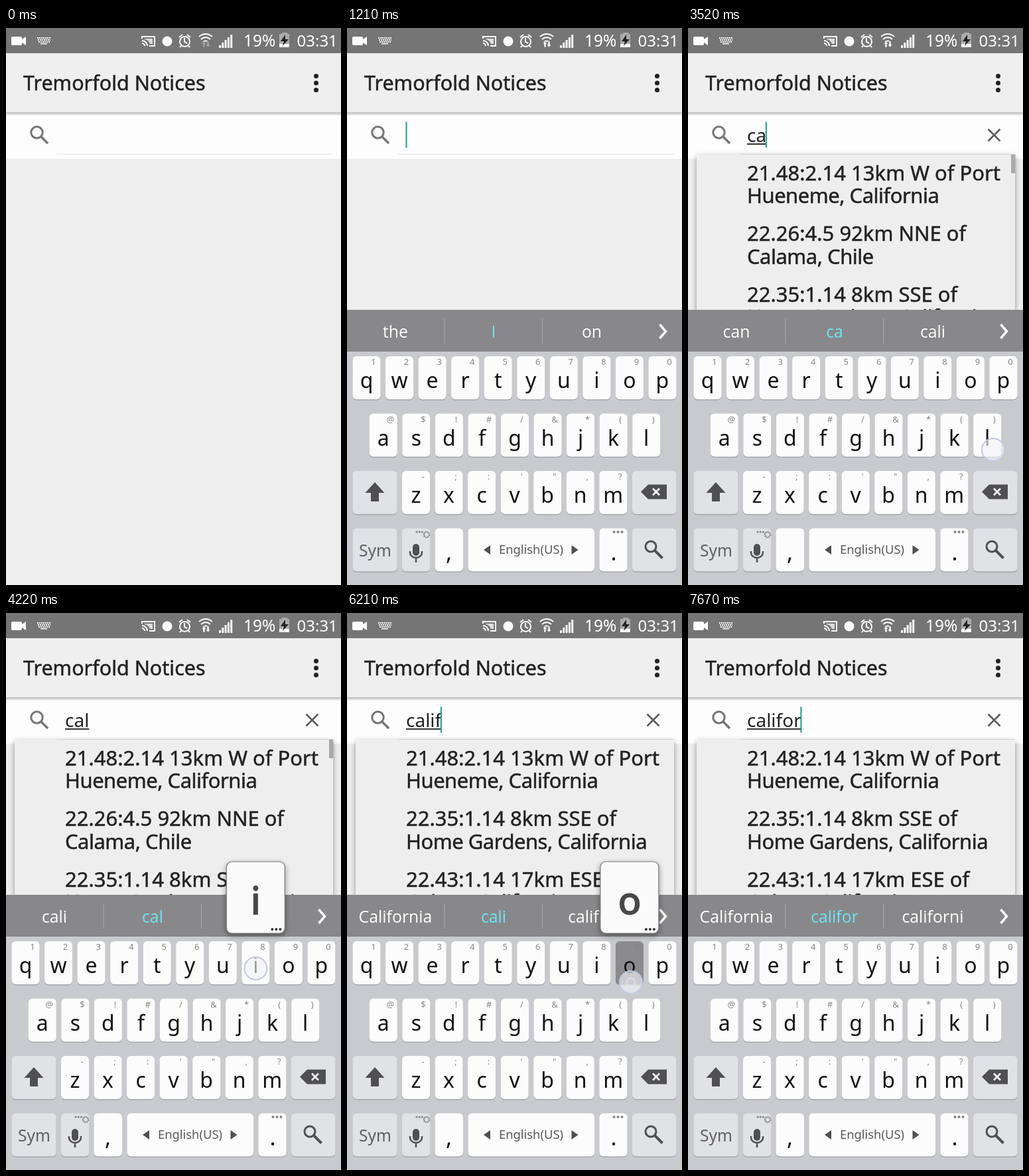
An HTML page that plays this animation: 505x840 px, repeating every 8000 ms.

```html
<!DOCTYPE html>
<html lang="en">
<head>
<meta charset="utf-8">
<title>Search as you type</title>
<style>
html, body { margin: 0; width: 100%; height: 100%; overflow: hidden; background: #eee; }
svg { display: block; width: 505px; height: 840px; font-family: "Noto Sans", "Open Sans", sans-serif; }
text { white-space: pre; }
.line { fill: none; stroke: currentColor; stroke-width: 2; }
.firm { stroke: #222; stroke-width: .5; }
.place { letter-spacing: -.5px; }
.word { font-family: "Open Sans", "Noto Sans", sans-serif; text-anchor: middle; }
</style>
</head>
<body>
<svg id="stage" viewBox="0 0 505 840">
  <defs>
    <filter id="soft" x="-10%" y="-10%" width="120%" height="120%">
      <feDropShadow dx="0" dy="3" stdDeviation="4" flood-opacity=".4"/>
    </filter>
    <linearGradient id="edge" x2="0" y2="1">
      <stop stop-color="#b9b9b9"/><stop offset="1" stop-color="#f4f4f4"/>
    </linearGradient>
  </defs>
  <rect width="505" height="840" fill="#eee"/>
  <rect y="127" width="505" height="70" fill="#fdfdfd"/>
  <rect y="127" width="505" height="5" fill="url(#edge)"/>
  <rect y="38" width="505" height="89" fill="#efefef"/>
  <text class="firm" x="26" y="94" font-size="30.500" fill="#222">Tremorfold Notices</text>
  <g fill="#222"><circle cx="467.5" cy="72.5" r="3.5"/><circle cx="467.5" cy="83" r="3.5"/><circle cx="467.5" cy="93.5" r="3.5"/></g>
  <path d="M77 190.5H493" stroke="#e6e6e6"/>
  <g fill="none" stroke="#757575" stroke-width="3"><circle cx="46.5" cy="157.5" r="8.7"/><path d="M53 164L63 174" stroke-width="3.6"/></g>

  <rect width="505" height="38" fill="#757575"/>
  <g fill="#fff" color="#fff">
    <path d="M8 15q0-2 2-2h12q2 0 2 2v2l6-4v13l-6-4v2q0 2-2 2H10q-2 0-2-2z"/>
    <path class="line" d="M47 15H67M48 18H67M49 21H66" stroke-dasharray="2 1"/><path d="M52 23H62V24.500H52z"/>
    <path class="line" d="M205 16V13H224V27H216M205 19a8 8 0 0 1 8 8M205 23a4 4 0 0 1 4 4"/><path d="M209 16H221V24H217Q215 18 209 17z" opacity=".75"/>
    <circle cx="243" cy="20" r="7.5"/>
    <circle class="line" cx="269.500" cy="20.500" r="7.500"/><path class="line" d="M269 15V21L273 23M261 14L266 10M273 10L278 14M264 27L262 29M275 27L277 29"/>
    <path class="line" d="M291 13Q301 5 311 13M294 17Q301 11 308 17M297 21Q301 18 305 21" stroke-width="2.6"/>
    <g id="bars"></g>
    <text x="358" y="28" font-size="24.500">19%</text>
    <path d="M416 7H424V9H427V29H412V9H416z" opacity=".4"/><path d="M412 24H427V29H412z"/>
    <path d="M421 10L414 20H419L417 27L426 17H421z" fill="#222"/>
    <text x="438.500" y="28" font-size="24">03:31</text>
  </g>
  <g id="field"></g>
  <g id="board"></g>
  <g id="touch"></g>
</svg>
<script>
const $ = id => document.getElementById(id);
const rect = (x, y, w, h, fill, extra = '') =>
  `<rect x="${x}" y="${y}" width="${w}" height="${h}" fill="${fill}" ${extra}/>`;
const label = (s, x, y, size, fill, extra = 'text-anchor="middle"') =>
  `<text x="${x}" y="${y}" font-size="${size}" fill="${fill}" ${extra}>${s}</text>`;
const path = (d, fill, extra = '') => `<path d="${d}" fill="${fill}" ${extra}/>`;
const dots = (x, y, gap, r, fill) =>
  [0, 1, 2].map(i => `<circle cx="${x + i * gap}" cy="${y}" r="${r}" fill="${fill}"/>`).join('');
const cap = (x, y, w, fill) =>
  rect(x, y + 1.5, w, 65, '#a6a7aa', 'rx="6"') + rect(x, y, w, 65, fill, 'rx="6"');

// Letter keys
const rows = [
  ['qwertyuiop', '1234567890', 8.5, 495],
  ['asdfghjkl', '@$!#/&*()', 33.8, 581.5],
  ['zxcvbnm', "-;:'\",?", 83, 668]
];
const keys = {};
for (const [letters, hints, x, y] of rows)
  [...letters].forEach((ch, i) => keys[ch] = { ch, hint: hints[i].replace('&', '&amp;'), x: x + i * 49.55, y });
const drawKey = (k, fill = '#fcfcfc') => cap(k.x, k.y, 42, fill) +
  label(k.hint, k.x + 31.5, k.y + 13, 13, '#858585') +
  label(k.ch, k.x + 21, k.y + 48, 32, '#111');

function drawBoard() {
  const grey = '#e1e2e4', ink = '#505052';
  return rect(0, 488, 505, 360, '#c9cacd') + Object.values(keys).map(k => drawKey(k)).join('') +
    cap(8.5, 668, 67, grey) + path('M42 685L56.500 701H48V714H36V701H27.500z', ink) +
    cap(430, 668, 66.5, grey) + path('M443 699.500L454 688.500H482V710.500H454z', ink) +
    path('M461 694.500L471 704.500M471 694.500L461 704.500', 'none', 'stroke="#fff" stroke-width="2.5"') +
    cap(8.5, 754.5, 67, grey) + label('Sym', 42.5, 796.5, 24.5, '#606062') +
    cap(83, 754.5, 42.5, grey) + rect(99, 778, 10, 18, ink, 'rx="5"') +
    path('M95 789v2a9 8 0 0 0 18 0v-2M104 799v7', 'none', `stroke="${ink}" stroke-width="2.5"`) +
    dots(105, 760, 4.2, 1.6, '#858585') +
    '<circle cx="120" cy="764" r="4" fill="none" stroke="#858585" stroke-width="2.5" stroke-dasharray="2 1"/>' +
    cap(132.5, 754.5, 42.5, '#fcfcfc') + label(',', 153.5, 803, 34, '#111') +
    cap(182.5, 754.5, 190.5, '#fcfcfc') + label('English(US)', 277.5, 793, 18.4, '#58585a') +
    path('M206 787l10-7v14zM348.500 787l-10-7v14z', ink) +
    cap(380.5, 754.5, 42, '#fcfcfc') + label('.', 402, 803, 34, '#111') + dots(402.5, 760, 6, 2, '#858585') +
    cap(430, 754.5, 66.5, grey) +
    path('M464 788L475.500 799.500', 'none', `stroke="${ink}" stroke-width="4"`) +
    `<circle cx="458" cy="782" r="8" fill="none" stroke="${ink}" stroke-width="3"/>`;
}

function drawWords(words) {
  return rect(0, 425, 505, 64, '#88888a') + rect(146.5, 438, 1, 38, '#a9a9ab') + rect(294, 438, 1, 38, '#a9a9ab') +
    words.map((w, i) => label(w, 73 + 148 * i, 467, 24.8, i == 1 ? '#6ce5f3' : '#fff', 'class="word"')).join('') +
    path('M471.500 447L480.500 457.500L471.500 468', 'none', 'stroke="#fff" stroke-width="3.5"');
}

const words = [
  ['the', 'I', 'on'], ['can', 'c', 'call'], ['can', 'ca', 'cali'], ['cali', 'cal', 'call'],
  ['California', 'cali', 'califor'], ['California', 'califor', 'californi']
];
const places = [
  ['21.48:2.14 13km W of Port', 'Hueneme, California'],
  ['22.26:4.5 92km NNE of', 'Calama, Chile'],
  ['22.35:1.14 8km SSE of', 'Home Gardens, California'],
  ['22.43:1.14 17km ESE of', 'Colton, California']
];
const found = { broad: [0, 1, 2], narrow: [0, 2, 3] };
const fingers = {
  c: [193.5, 714.5], a: [58, 629], l: [460, 636], i: [376.5, 536], f: [203, 631], o: [428, 557], r: [178, 526]
};

function drawField(typed, caret, narrow) {
  let out = '';
  if (typed) {
    out += rect(13, 191, 480, 235, '#eee', 'rx="3" filter="url(#soft)"') + path('M77 190.500H493', 'none', 'stroke="#d2d2d2"');
    found[narrow ? 'narrow' : 'broad'].forEach((p, i) => places[p].forEach((s, j) =>
      out += label(s, 89, 229.7 + 91.5 * i + 34.5 * j, 31, '#222', `class="firm ${j ? 'place' : ''}"`)));
    if (!narrow) out += rect(487, 191, 6.5, 28, '#a9a9a9');
    out += path('M452.500 152.500L470.500 170.500M470.500 152.500L452.500 170.500', 'none', 'stroke="#5c5c5c" stroke-width="2.6"');
    out += label(typed, 89, 172, 28, '#222', 'id="typed"');
  }
  $('field').innerHTML = out;
  const end = typed ? $('typed').getComputedTextLength() : 0;
  if (typed) $('field').innerHTML += rect(89, 174, end, 2, '#333');
  if (caret) $('field').innerHTML += rect(88.5 + end - (typed ? .8 : 0), 141.5, 2, 39, '#1f9c8f');
}

function drawTouch(ch, stage) {
  if (!ch) return '';
  const k = keys[ch], [x, y] = fingers[ch], px = k.x - 23, py = k.y - 120;
  let out = stage == 2 ? drawKey(k, '#8b8b8d') : '';
  out += `<circle cx="${x}" cy="${y}" r="17" fill="#f4f4f8" fill-opacity=".62" stroke="#c3c9e4" stroke-width="2"/>`;
  if (stage == 2) out += `<circle cx="${x}" cy="${y}" r="6" fill="none" stroke="#e6e6f0" stroke-opacity=".6" stroke-width="3"/>`;
  if (stage) out += rect(px, py, 88, 108, '#fafafa', 'rx="8" stroke="#77777a" stroke-width="1.2" filter="url(#soft)"') +
    label(ch, px + 44, py + 79, 57, '#484848', 'text-anchor="middle" stroke="#484848" stroke-width="2"') +
    dots(px + 69, py + 102, 6, 2, '#333');
  return out;
}

// time, typed text, word set, caret, finger on key, stage (0 touch, 1 bubble, 2 pressed)
const steps = [
  [0, '', 0, 0], [270, '', 0, 1], [400, '', 0, 1], [810, '', 0, 0], [1210, '', 0, 1], [1770, '', 0, 0], [2180, '', 0, 1],
  [2450, '', 0, 1, 'c', 0], [2720, '', 0, 1, 'c', 2], [2870, 'c', 1, 1], [3000, 'c', 1, 1, 'a', 0],
  [3120, 'c', 1, 1, 'a', 2], [3260, 'ca', 1, 1], [3390, 'ca', 2, 1], [3520, 'ca', 2, 1, 'l', 0],
  [3670, 'ca', 2, 1, 'l', 2], [3800, 'cal', 2, 1], [3930, 'cal', 3, 1], [4070, 'cal', 3, 1, 'i', 0],
  [4220, 'cal', 3, 0, 'i', 1], [4370, 'cal', 3, 0, 'i', 2], [4500, 'cali', 3, 1], [4640, 'cali', 4, 1],
  [4790, 'cali', 4, 0], [5190, 'cali', 4, 1], [5750, 'cali', 4, 0, 'f', 0], [5880, 'cali', 4, 0, 'f', 2],
  [6000, 'calif', 4, 1], [6100, 'calif', 4, 1, 'o', 0], [6210, 'calif', 4, 1, 'o', 2], [6360, 'califo', 4, 1],
  [6490, 'califo', 4, 1, 'r', 0], [6730, 'califo', 4, 1, 'r', 2], [6870, 'califor', 4, 1],
  [7120, 'califor', 5, 0], [7670, 'califor', 5, 1]
];

const boardKeys = drawBoard();
let shown = -1;
function show(n) {
  const [t, typed, set, caret, ch, stage] = steps[n];
  drawField(typed, caret, set > 3);
  $('board').innerHTML = t ? drawWords(words[set]) + boardKeys : '';
  $('board').setAttribute('transform', `translate(0 ${t == 270 ? 100 : 0})`);
  $('touch').innerHTML = drawTouch(ch, stage);
  $('bars').innerHTML = [0, 1, 2, 3, 4].map(i => rect(321 + 4.3 * i, 26 - 4 * i, 3, 4 + 4 * i, '#fff')).join('') +
    path('M298.500 20l3.500 4h-2v5h-3v-5h-2zM304.500 29l3.500-4h-2v-5h-3v5h-2z', t ? '#fff' : '#a5a5a5', 'stroke="#757575" stroke-width=".6"');
}

const start = performance.now();
function tick() {
  const t = (performance.now() - start) % 8000;
  const n = steps.findLastIndex(s => s[0] <= t);
  if (n != shown) show(shown = n);
  requestAnimationFrame(tick);
}
tick();
</script>
</body>
</html>
```
